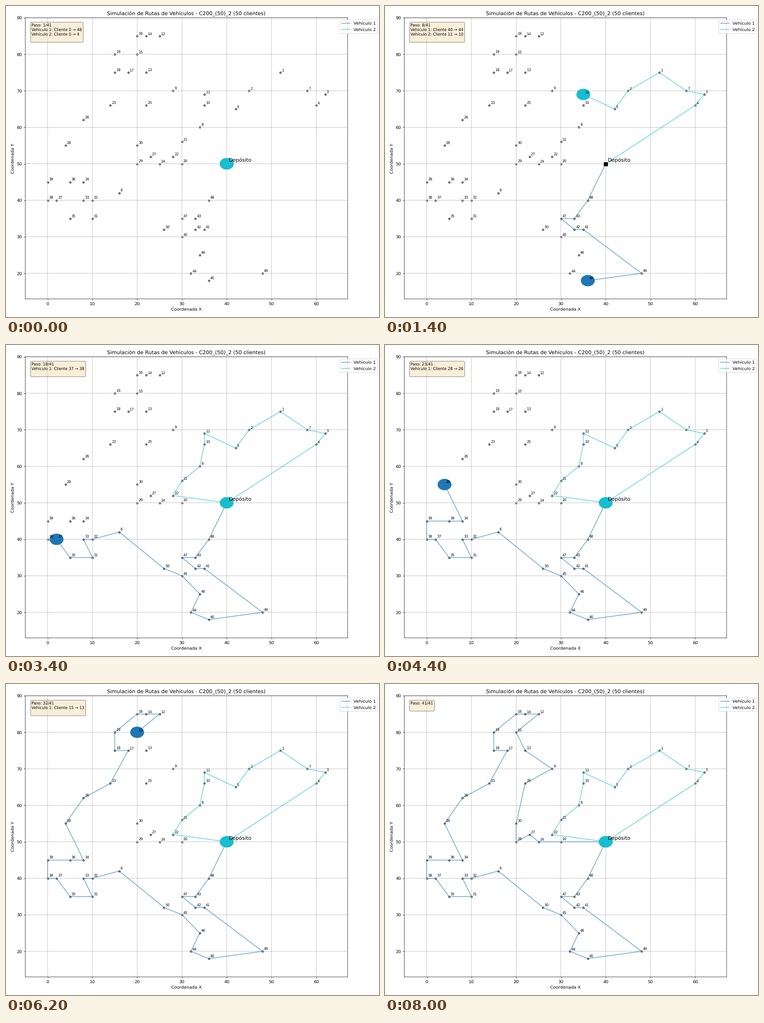
These frames come from a looping animation (820 by 683 pixels, 8200 ms). A matplotlib script:

```python
import math

import matplotlib.pyplot as plt
from matplotlib.animation import FuncAnimation
from matplotlib.patches import Circle

DPI = 820 / 12
STEP_MS = 200

# Index 0 is the depot, the rest are clients.
NODES = [
    (40, 50), (52, 75), (45, 70), (62, 69), (60, 66), (42, 65), (16, 42),
    (58, 70), (34, 60), (28, 70), (35, 66), (35, 69), (25, 85), (22, 75),
    (22, 85), (20, 80), (20, 85), (18, 75), (15, 75), (15, 80), (30, 50),
    (30, 56), (28, 52), (14, 66), (25, 50), (22, 66), (8, 62), (23, 52),
    (4, 55), (20, 50), (20, 55), (10, 35), (10, 40), (8, 40), (8, 45),
    (5, 35), (5, 45), (2, 40), (0, 40), (0, 45), (36, 18), (35, 32),
    (33, 32), (33, 35), (32, 20), (30, 30), (34, 25), (30, 35), (36, 40),
    (48, 20), (26, 32),
]
COLORS = ["#1f77b4", "#17becf"]


def build_route(pending, jumps):
    """Visit the nearest pending client, except where a jump overrides it."""
    route = [0]
    while len(route) == 1 or route[-1] != 0:
        here = route[-1]
        nearest = min(pending, default=0, key=lambda k: (
            math.dist(NODES[here], NODES[k]), -k))
        route.append(jumps.get(here, nearest))
        pending.discard(route[-1])
    return route


# The short route is planned first; the long one takes every client left.
pending = set(range(1, len(NODES)))
short = build_route(pending, {0: 4, 5: 11, 22: 0})
long = build_route(pending, {0: 48, 41: 49, 33: 31, 23: 17, 19: 16, 30: 29})
ROUTES = [long, short]
STEPS = len(long)

fig, ax = plt.subplots(figsize=(820 / DPI, 683 / DPI), dpi=DPI)
xs, ys = zip(*NODES)
ax.set_xlim(min(xs) - 5, max(xs) + 5)
ax.set_ylim(min(ys) - 5, max(ys) + 5)
ax.set_title("Simulación de Rutas de Vehículos - C200_(50)_2 (50 clientes)")
ax.set_xlabel("Coordenada X")
ax.set_ylabel("Coordenada Y")
ax.grid(True)

ax.scatter(xs[1:], ys[1:], c="black", s=20, alpha=0.5)
ax.plot(*NODES[0], "ks", markersize=8, zorder=2.2)
ax.text(xs[0] + 0.5, ys[0] + 0.5, "Depósito", fontsize=12)
for i, (x, y) in enumerate(NODES[1:], 1):
    ax.text(x + 0.3, y + 0.3, str(i), fontsize=8)

trails, vehicles = [], []
for n, color in enumerate(COLORS, 1):
    trails += ax.plot([], [], color=color, lw=1.5, alpha=0.7,
                      label=f"Vehículo {n}")
    vehicles.append(ax.add_patch(
        Circle(NODES[0], 1.5, color=color, zorder=2.5)))

info = ax.text(0.02, 0.98, "", transform=ax.transAxes, fontsize=9, va="top",
               bbox=dict(boxstyle="round", facecolor="wheat", alpha=0.5))
ax.legend(loc="upper right", bbox_to_anchor=(1.1, 1))

# Lay out at 100 dpi, then draw smaller with soft, unsnapped edges.
fig.dpi = 100
fig.tight_layout()
fig.dpi = DPI
plt.rcParams.update({"path.snap": False, "text.hinting": "none"})


def update(step):
    lines = [f"Paso: {step + 1}/{STEPS}"]
    for n, route in enumerate(ROUTES):
        path = [NODES[k] for k in route[:step + 1]]
        trails[n].set_data(*zip(*path))
        vehicles[n].center = path[-1]
        if step + 1 < len(route):
            lines.append(f"Vehículo {n + 1}: Cliente "
                         f"{route[step]} → {route[step + 1]}")
    info.set_text("\n".join(lines) + "\n")
    return [*trails, *vehicles, info]


anim = FuncAnimation(fig, update, frames=STEPS, interval=STEP_MS,
                     repeat=True, repeat_delay=0)
plt.show()
```
